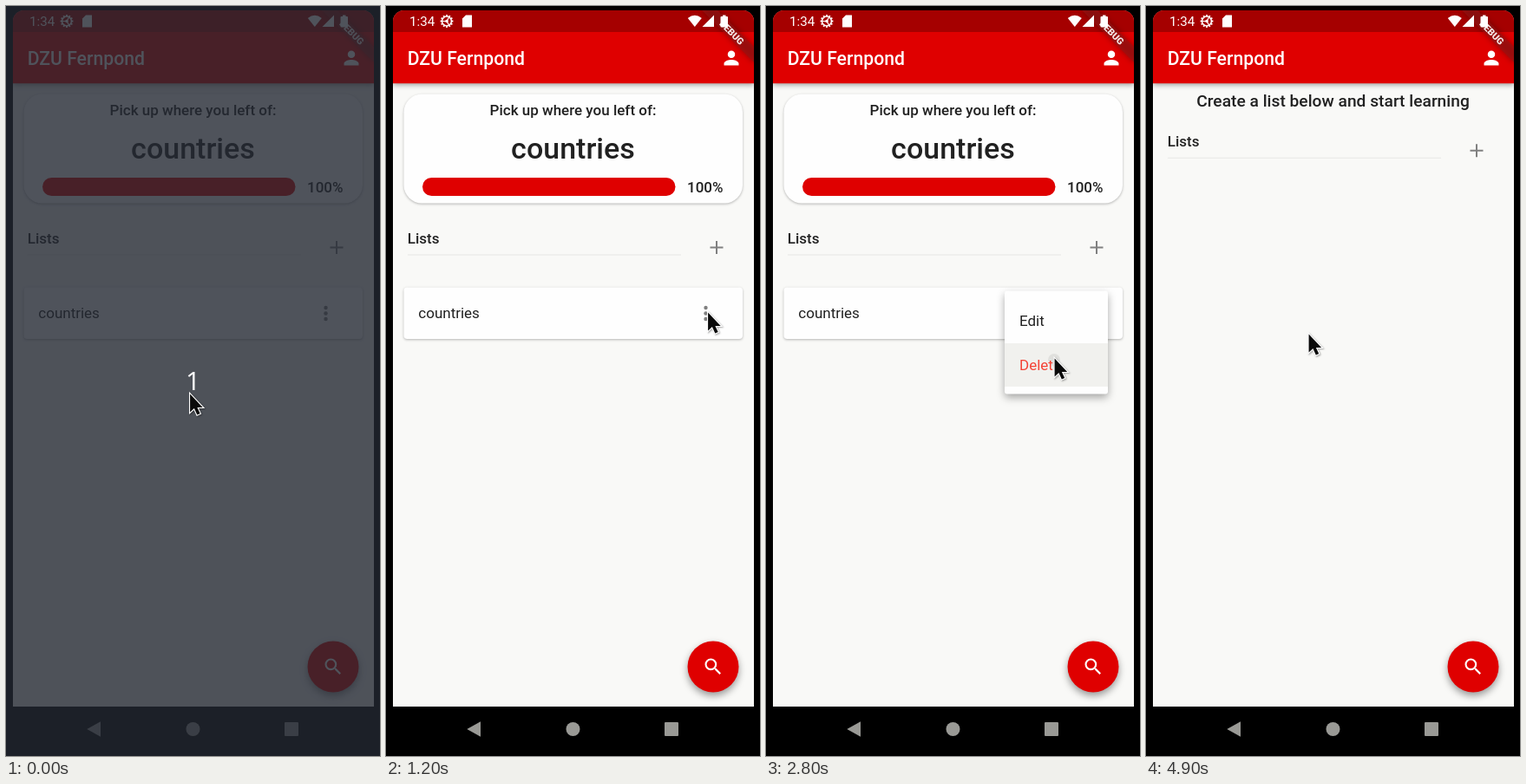
Recreate the animation shown at these times as an HTML page with a canvas. Size 431 by 865 pixels, loop 6.2 s.

```html
<!DOCTYPE html>
<html lang="en">
<head>
<meta charset="utf-8">
<title>Word lists</title>
<style>
  html, body { margin: 0; width: 100%; height: 100%; overflow: hidden; background: #000; }
  canvas { display: block; width: 431px; height: 865px; }
</style>
</head>
<body>
<canvas id="stage" width="431" height="865"></canvas>
<script>
const ctx = document.getElementById('stage').getContext('2d');
const LOOP = 6200, STEP = 100;
const RED = '#df0000', INK = '#212121', GREY = '#808080', PAPER = '#f9f9f7', CARD = '#fefefe';
const DP = 1.059;

const PERSON = new Path2D('M12 12a4 4 0 1 0 0-8 4 4 0 0 0 0 8zm0 2c-2.67 0-8 1.34-8 4v2h16v-2c0-2.66-5.33-4-8-4z');
const SEARCH = new Path2D('M15.5 14h-.79l-.28-.27A6.47 6.47 0 0 0 16 9.5 6.5 6.5 0 1 0 9.5 16c1.61 0 3.09-.59 4.23-1.57l.27.28v.79l5 4.99L20.49 19l-4.99-5zm-6 0a4.5 4.5 0 1 1 0-9 4.5 4.5 0 0 1 0 9z');
const ARROW = new Path2D('M0 0V21L4.8 16.6 8.2 24 11.6 22.5 8.3 15.4H14.6Z');

const clamp = v => Math.max(0, Math.min(1, v));
const span = (t, a, b) => clamp((t - a) / (b - a));
const easeOut = u => 1 - Math.pow(1 - u, 1.68);
const smooth = u => u * u * (3 - 2 * u);
const quadInOut = u => u < .5 ? 2 * u * u : 1 - 2 * (1 - u) * (1 - u);
const bezier = (a, b, c, p) => (1 - p) * (1 - p) * a + 2 * p * (1 - p) * b + p * p * c;

function saved(fn) { ctx.save(); fn(); ctx.restore(); }

function box(x, y, w, h, color, r = 0) {
  ctx.beginPath();
  ctx.roundRect(x, y, w, h, r);
  ctx.fillStyle = color;
  ctx.fill();
}

function disc(x, y, r, color) {
  ctx.beginPath();
  ctx.arc(x, y, r, 0, 7);
  ctx.fillStyle = color;
  ctx.fill();
}

function poly(points, color) {
  ctx.beginPath();
  points.forEach(([x, y]) => ctx.lineTo(x, y));
  ctx.closePath();
  ctx.fillStyle = color;
  ctx.fill();
}

function shadow(alpha, blur, dy) {
  ctx.shadowColor = `rgba(0,0,0,${alpha})`;
  ctx.shadowBlur = blur;
  ctx.shadowOffsetY = dy;
}

function text(str, x, y, size, weight = 400, color = INK, align = 'left') {
  ctx.font = `${weight} ${size}px Roboto, sans-serif`;
  ctx.textAlign = align;
  ctx.fillStyle = color;
  ctx.fillText(str, x, y);
}

function icon(path, x, y) {
  saved(() => {
    ctx.translate(x, y);
    ctx.scale(DP, DP);
    ctx.translate(-12, -12);
    ctx.fillStyle = '#fff';
    ctx.fill(path);
  });
}

function card(x, y, w, h, r) {
  saved(() => { shadow(.28, 3, 1); box(x, y, w, h, CARD, r); });
}

function listsHeader(y) {
  text('Lists', 24.7, y, 17, 500);
  box(25, y + 12.5, 315, 1, '#e8e8e6');
  box(373.5, y + 3.5, 15, 2, GREY);
  box(380, y - 3, 2, 15, GREY);
}

function ripple(alpha) {
  saved(() => {
    ctx.beginPath();
    ctx.rect(20.5, 324.5, 390.5, 59.5);
    ctx.clip();
    disc(368, 354, 36.5, `rgba(0,0,0,${alpha})`);
  });
}

function fullPage(t) {
  card(20.5, 101.5, 390.5, 126, 21);
  text('Pick up where you left of:', 215.5, 126, 17, 500, INK, 'center');
  text('countries', 215.5, 176, 34, 500, INK, 'center');
  box(42, 198, 291.5, 21, RED, 10.5);
  text('100%', 347, 214.5, 17, 500);
  listsHeader(274);
  card(20.5, 324.5, 390.5, 59.5, 4);
  text('countries', 37.3, 360, 17);
  for (const y of [348, 354.5, 361]) disc(368.5, y, 2.2, GREY);
  if (t >= 1800 && t < 2000) ripple(t < 1900 ? .09 : .04);
}

function emptyPage() {
  text('Create a list below and start learning', 215.5, 116, 19.2, 500, INK, 'center');
  listsHeader(162.3);
}

// Unfolds from its top right corner; the rows fade in one after the other.
function menu(open, press) {
  if (open <= 0) return;
  const unit = 1 / 3.5;
  const w = 119 * clamp(open / unit), h = 119 * clamp(open / unit / 2);
  const x = 394 - w, y = 328.5;
  const fade = clamp(open * 3);
  saved(() => {
    ctx.globalAlpha = fade;
    saved(() => { shadow(.34, 10, 4); box(x, y, w, h, CARD, 3); });
    ctx.beginPath();
    ctx.rect(x, y, w, h);
    ctx.clip();
    if (press > 0) {
      box(275, 389, 119, 50, '#f1f1ee');
      ctx.save();
      ctx.beginPath();
      ctx.rect(275, 389, 119, 50);
      ctx.clip();
      disc(332, 408, 7 + 70 * (press - 1), 'rgba(0,0,0,.07)');
      ctx.restore();
    }
    ['Edit', 'Delete'].forEach((label, i) => {
      const start = (i + 1) * unit;
      ctx.globalAlpha = fade * span(open, start, start + 1.5 * unit);
      text(label, 292, 369 + 50.5 * i, 17, 400, i ? '#f44336' : INK);
    });
  });
}

function statusBar() {
  text('1:34', 27, 23.3, 15.2, 400, '#fff');
  saved(() => {
    ctx.translate(70, 17.5);
    ctx.strokeStyle = '#fff';
    ctx.lineWidth = 1.5;
    ctx.beginPath();
    ctx.arc(0, 0, 5.4, 0, 7);
    ctx.stroke();
    for (let i = 0; i < 12; i++) {
      ctx.rotate(Math.PI / 6);
      box(-.9, -7.4, 1.8, 2, '#fff');
      if (i % 4 === 0) box(-.6, -5, 1.2, 4, '#fff');
    }
    disc(0, 0, 1.8, '#fff');
  });
  poly([[92, 10.5], [99, 10.5], [99, 24.5], [88, 24.5], [88, 14.5]], '#fff');

  ctx.beginPath();
  ctx.moveTo(355.8, 24);
  ctx.lineTo(347.8, 14);
  ctx.quadraticCurveTo(355.8, 7.5, 363.8, 14);
  ctx.fillStyle = '#fff';
  ctx.fill();
  poly([[378, 10.5], [378, 24], [364.5, 24]], '#fff');
  box(385.5, 12, 8.5, 12.5, '#fff', 1);
  box(388, 10.5, 3.5, 2, '#fff');
}

function ribbon() {
  saved(() => {
    ctx.translate(424, 5);
    ctx.rotate(Math.PI / 4);
    ctx.scale(DP, DP);
    saved(() => { shadow(.5, 7, 0); box(-40, 28, 80, 12, 'rgba(150,22,22,.63)'); });
    text('DEBUG', 0, 37.7, 10.2, 900, '#f4e8e8', 'center');
  });
}

function navBar() {
  const tone = '#999995';
  poly([[93.3, 834], [109, 825.3], [109, 842.7]], tone);
  disc(215.5, 834, 8, tone);
  box(321, 826, 16, 16, tone, 1);
}

function phone(t) {
  box(0, 0, 431, 865, '#000');
  saved(() => {
    ctx.beginPath();
    ctx.roundRect(8, 5, 416, 803, [13, 13, 0, 0]);
    ctx.clip();
    box(8, 5, 416, 803, PAPER);
    if (t < 3100) fullPage(t); else emptyPage();

    saved(() => { shadow(.38, 6, 2); box(8, 5, 416, 84.3, RED); });
    box(8, 5, 416, 25, '#a50000');
    text('DZU Fernpond', 24.7, 68, 21.2, 500, '#fff');
    icon(PERSON, 398, 60);

    saved(() => { shadow(.4, 9, 4); disc(377, 762, 29.5, RED); });
    icon(SEARCH, 377, 762);

    const open = t < 2900
      ? (t < 1800 ? 0 : clamp(.22 + (t - 1800) * .0039))
      : 1 - span(t, 2900, 3150);
    menu(open, t >= 2800 ? 1 + span(t, 2800, 3000) * 2 : 0);

    ribbon();
    statusBar();
  });
  navBar();
}

function pointerAt(t) {
  if (t < 1200) {
    const p = easeOut(span(t, 400, 1100));
    return [211.5 + 158 * p, bezier(446.5, 331, 352.5, p)];
  }
  if (t < 4200) {
    const p = smooth(span(t, 2100, 2500));
    return [370.5 - 38.5 * p, 352.5 + 53 * p];
  }
  const p = quadInOut(span(t, 4100, 4900));
  return [bezier(332, 259.5, 187, p), bezier(405.5, 401, 377.5, p)];
}

function pointer(x, y) {
  saved(() => {
    ctx.translate(x + .6, y + 1);
    saved(() => {
      shadow(.35, 2, 1);
      ctx.shadowOffsetX = 1;
      ctx.lineWidth = 2.2;
      ctx.strokeStyle = '#fff';
      ctx.stroke(ARROW);
    });
    ctx.fillStyle = '#0a0a0a';
    ctx.fill(ARROW);
  });
}

function draw(ms) {
  const t = Math.floor((ms % LOOP) / STEP) * STEP;
  phone(t);
  if (t < 100) {
    box(0, 0, 431, 865, 'rgba(36,40,50,.8)');
    ctx.font = '30px "Open Sans", sans-serif';
    ctx.textAlign = 'center';
    ctx.fillStyle = '#fff';
    ctx.fillText('1', 215.5, 443);
  }
  pointer(...pointerAt(t));
}

const began = performance.now();
function frame() {
  draw(performance.now() - began);
  requestAnimationFrame(frame);
}
frame();
</script>
</body>
</html>
```
